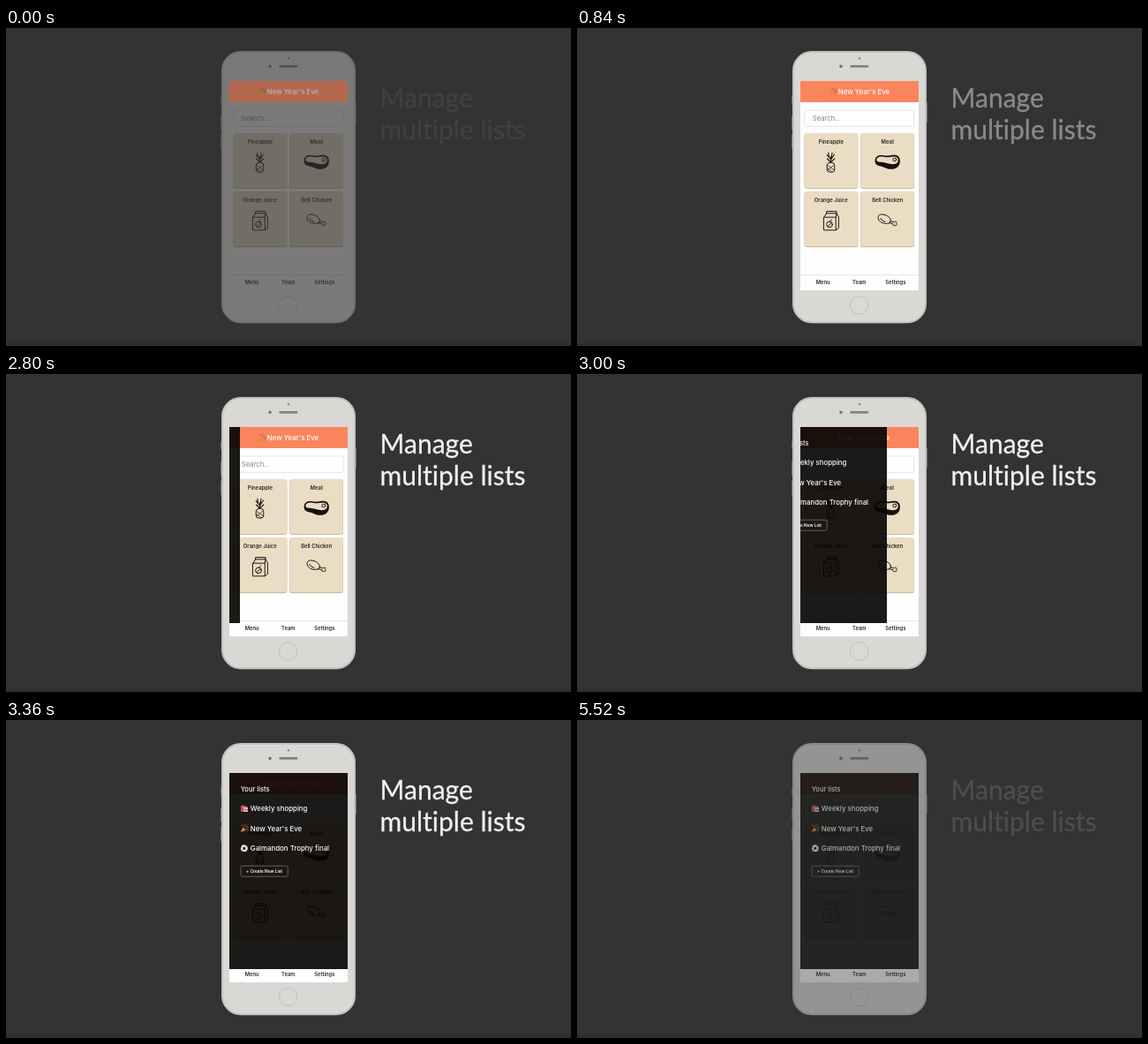
An HTML page for the animation above (5560 ms loop, 640 px wide and 360 px high).

```html
<!DOCTYPE html>
<html lang="en">
<head>
<meta charset="utf-8">
<title>Manage multiple lists</title>
<style>
  html, body { margin: 0; width: 100%; height: 100%; overflow: hidden; background: #333; }
  svg { display: block; width: 640px; height: 360px; font-family: Inter, "Open Sans", sans-serif; font-variant-ligatures: none; }

  .body, .screen, .ui, .head, .drawer, .title { animation: 5560ms linear infinite; }
  .body { animation-name: body; }
  .screen { animation-name: leave; }
  .ui { animation-name: ui; }
  .head { animation-name: head; }
  .drawer { animation-name: slide; }
  .title { animation-name: title; font: 30px Lato, "Open Sans", sans-serif; font-variant-ligatures: none; fill: #f0f0f0; stroke: #f0f0f0; stroke-width: .3; }

  .bold { font-weight: 600; }
  .mid { text-anchor: middle; }
  .label { font-size: 5.9px; fill: #2b2722; }
  .tab { font-size: 5.8px; fill: #222a33; }
  .item { font-size: 7.85px; font-weight: 500; fill: #fff; }
  .ink { fill: none; stroke: #1b1814; stroke-width: 1; stroke-linecap: round; stroke-linejoin: round; }

  @keyframes body {
    0% { opacity: .43; }
    10.79%, 84.53% { opacity: 1; }
    100% { opacity: .57; }
  }
  @keyframes leave {
    0%, 84.53% { opacity: 1; }
    100% { opacity: .57; }
  }
  @keyframes ui {
    0% { opacity: .35; }
    10.79%, 100% { opacity: 1; }
  }
  @keyframes head {
    0% { opacity: .65; }
    10.79%, 100% { opacity: 1; }
  }
  @keyframes slide {
    0%, 49.35% { transform: translateX(-134px); animation-timing-function: ease; }
    59.96%, 100% { transform: none; }
  }
  /* The title fades in small holds of about 200 ms. */
  @keyframes title {
    0% { opacity: .07; }
    10.79% { opacity: .36; animation-timing-function: step-end; }
    15.1% { opacity: .46; animation-timing-function: step-end; }
    18.7% { opacity: .53; animation-timing-function: step-end; }
    21.58% { opacity: .59; animation-timing-function: step-end; }
    25.17% { opacity: .66; animation-timing-function: step-end; }
    28.77% { opacity: .75; animation-timing-function: step-end; }
    36.69% { opacity: .88; animation-timing-function: step-end; }
    39.56% { opacity: .94; animation-timing-function: step-end; }
    42.44% { opacity: 1; animation-timing-function: step-end; }
    69.78% { opacity: .98; animation-timing-function: step-end; }
    71.94% { opacity: .92; animation-timing-function: step-end; }
    75.53% { opacity: .82; animation-timing-function: step-end; }
    79.13% { opacity: .72; animation-timing-function: step-end; }
    82.01% { opacity: .64; animation-timing-function: step-end; }
    84.89% { opacity: .56; }
    100% { opacity: .12; }
  }
</style>
</head>
<body>
<svg viewBox="0 0 640 360">
  <defs>
    <clipPath id="glass"><rect x="253" y="60" width="134" height="237"/></clipPath>
    <g id="card">
      <rect y=".8" width="61" height="62.6" rx="2.4" fill="#c9bb9f"/>
      <rect x=".4" y=".3" width="60.2" height="62" rx="2" fill="#ebddc4"/>
    </g>
    <g id="popper">
      <path d="M.6 9 3 3.6 6.2 6.8Z" fill="#e9a93c"/>
      <path d="M1.5 7 3 8M2.4 5 4.8 7.3" stroke="#8a5a1e" stroke-width=".6"/>
      <path d="M4 3.2Q4.8 1.8 4 .6M5.6 4.4Q6.4 2.2 8.6 2.2M6.4 5.8Q7.6 5 9 6" fill="none" stroke="#d8483c" stroke-width=".9"/>
      <path d="M1.2 1.4h1.2M6 .8h1M8 4.2h1.2M7 8.2h1" stroke="#5b9a4a" stroke-width="1"/>
    </g>
  </defs>

  <rect width="640" height="360" fill="#333"/>
  <rect y="356" width="640" height="4" fill="#302f2f"/>

  <g class="body">
    <path d="M244 76v9M244 99v16M244 121v16M396 84v23" stroke="#a9a8a6" stroke-width="1"/>
    <rect x="245" y="27" width="150" height="306.2" rx="21" fill="#d9d8d5" stroke="#c3c2c0" stroke-width="2"/>
    <circle cx="320" cy="34.2" r="1.2" fill="#8a8987"/>
    <circle cx="299" cy="43.4" r="1.8" fill="#777674"/>
    <rect x="309.3" y="42.1" width="21" height="2.7" rx="1.3" fill="#838280"/>
    <circle cx="319.6" cy="313.8" r="10.2" fill="#dad9d6" stroke="#bfbebb" stroke-width=".9"/>
  </g>

  <rect x="253" y="60" width="134" height="237" fill="#333"/>
  <g class="screen" clip-path="url(#glass)">
    <g class="ui">
      <rect x="253" y="84" width="134" height="213" fill="#fefefe"/>
      <rect x="257.7" y="93" width="124.2" height="18.4" rx="1.5" fill="#fff" stroke="#e2e2e2" stroke-width=".9"/>
      <text x="266.8" y="105" font-size="7.7" fill="#85858a">Search...</text>

      <use href="#card" x="257.4" y="118.6"/>
      <use href="#card" x="321" y="118.6"/>
      <use href="#card" x="257.4" y="184.8"/>
      <use href="#card" x="321" y="184.8"/>
      <g class="label bold mid">
        <text x="287.8" y="131.1">Pineapple</text>
        <text x="351.8" y="131.1">Meat</text>
        <text x="287.8" y="197.4">Orange Juice</text>
        <text x="351.8" y="197.4">Bell Chicken</text>
      </g>

      <!-- pineapple -->
      <g class="ink">
        <rect x="283.2" y="152.4" width="8.6" height="10.8" rx="3.2"/>
        <path d="M287.5 152 283.4 148M287.5 152 291.8 148M287.4 149 283.2 143.6M287.6 149 291.4 143.2M287.5 152V145.6M285.6 146 284.8 141.2M288.4 146 289 141.4" stroke-width="1.1"/>
        <path d="M284 155.4 291 160.6M284 159 288.6 162.6M291 155 284.4 160.8" stroke-width=".7"/>
      </g>

      <!-- steak -->
      <path d="M337.6 149.6C338 144.6 342.6 143.2 347.4 144.2 352.6 145.2 356 143.6 360 143.8 364.4 144.2 366.4 147.6 365.8 152 365.2 157 361.4 160 355.6 159.8 349.6 159.6 347.2 156.6 342.8 156.2 339.2 155.8 337.2 153.2 337.6 149.6Z" fill="#14110e"/>
      <path d="M339.4 148.6C340.6 145.2 344.4 145.2 348.2 146 353 147 356 145.2 359.6 145.4 363 145.8 364.4 148.2 363.6 151 362.6 154 358.4 154.8 354 153.8 349.4 152.8 347.2 151.6 343.4 151.8 340.4 151.8 338.8 150.6 339.4 148.6Z" fill="#ebddc4"/>
      <circle cx="359.8" cy="149" r="1.9" class="ink"/>

      <!-- juice carton -->
      <g class="ink">
        <path d="M279.8 214.2H293.2V228.8H279.8ZM279.8 214.2 282.6 209.8H294L293.2 214.2M294 209.8 296.4 214V226.4L293.2 228.8M282.6 209.8V207.6H294V209.8"/>
        <circle cx="286" cy="222.4" r="3.4"/>
        <path d="M286.4 219 288.6 216.8M284.2 224.4 288.2 220.6"/>
      </g>

      <!-- drumstick -->
      <g class="ink">
        <path d="M354 220.6C350.6 222.2 345 221.4 342.4 218.2 340 215 341 211.4 344.4 211 349 210.6 354.6 213.6 355.4 217.4 355.6 218.8 355 220 354 220.6Z"/>
        <path d="M354.8 218.4 359.2 220C360.4 218.2 362.6 219.2 361.6 221.2 363 222.6 361.2 224.6 359.6 223.4 358.2 224 357.4 222.8 358 221.8L353.8 220.6M343.6 215.4Q345.2 218.8 349 219.4"/>
      </g>

      <path d="M253 279.7H387" stroke="#e2e2e2" stroke-width=".9"/>
      <g class="tab bold mid">
        <text x="278.6" y="289.8">Menu</text>
        <text x="319.8" y="289.8">Team</text>
        <text x="360.8" y="289.8">Settings</text>
      </g>
    </g>

    <g class="head">
      <rect x="253" y="60" width="134" height="24" fill="#fa855c"/>
      <use href="#popper" x="285" y="67.4"/>
      <text class="item" x="295.8" y="75.1">New Year's Eve</text>
    </g>

    <g class="drawer">
      <rect x="253" y="60" width="134" height="222" fill="#060504" fill-opacity=".915"/>
      <g class="item">
        <text x="265.8" y="80.8" font-size="7.5">Your lists</text>
        <text x="276.8" y="103.3">Weekly shopping</text>
        <text x="276.8" y="125.7">New Year's Eve</text>
        <text x="276.8" y="148.3">Galmandon Trophy final</text>
      </g>

      <!-- shopping bags -->
      <path d="M266 97.6h4.6v6h-4.6z" fill="#d9566a"/>
      <path d="M269 98.8h5v5.2h-5z" fill="#f0b3b4"/>
      <path d="M267 97.6q1.3-2.6 2.6 0M270.2 98.8q1.3-2.4 2.6 0" fill="none" stroke="#e9d6cf" stroke-width=".7"/>
      <path d="M266 100.4h3M269 101.6h5" stroke="#b73a4e" stroke-width=".9"/>

      <use href="#popper" x="265.4" y="118"/>

      <!-- ball -->
      <circle cx="269.8" cy="145.2" r="3.9" fill="#f2f2f2"/>
      <path d="M269.8 143.4 271.6 144.8 270.9 146.8H268.7L268 144.8ZM266.2 143.6 267.4 142.2 266.6 145ZM271.4 141.7 273 143.2 271 142.8ZM272.6 146.8 273.4 146 272 148.2ZM267 147.8 268.6 148.6 267.2 146.8Z" fill="#222"/>

      <rect x="266" y="165.2" width="53.2" height="12" rx="1.6" fill="none" stroke="#77736f" stroke-width=".8"/>
      <text class="bold mid" x="292.5" y="172.9" font-size="4.8" fill="#fff">+ Create New List</text>
    </g>
  </g>

  <g class="title">
    <text x="423.6" y="90.4">Manage</text>
    <text x="423.6" y="126">multiple lists</text>
  </g>
</svg>
</body>
</html>
```
